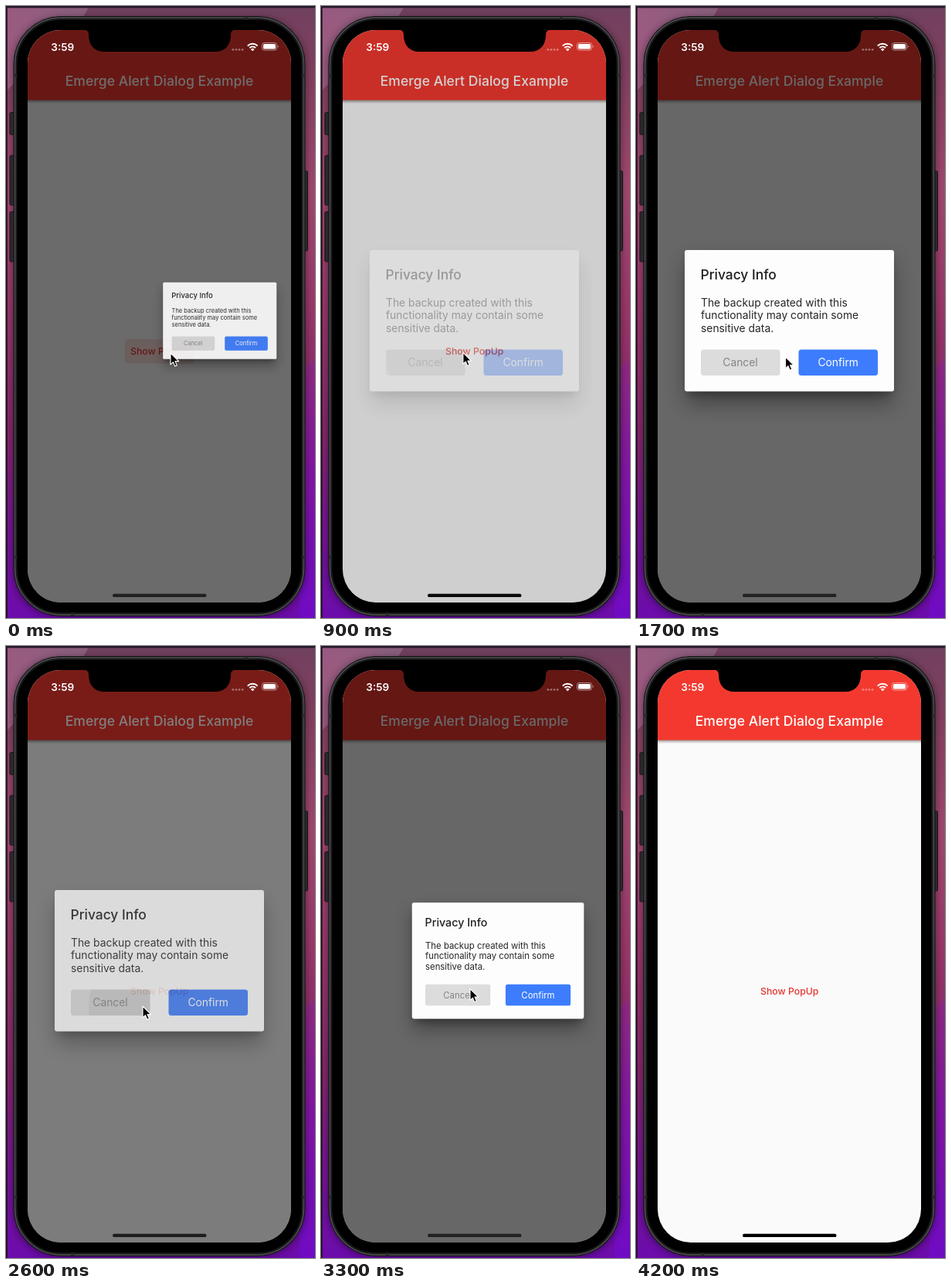
These frames come from a looping animation (400 by 790 pixels, 4900 ms). An HTML page:

```html
<!DOCTYPE html>
<html lang="en">
<head>
<meta charset="utf-8">
<title>Alert dialog</title>
<style>
  html, body { margin: 0; width: 100%; height: 100%; overflow: hidden; background: #000; }
  svg { display: block; }
  text { font-family: Inter, Roboto, sans-serif; }
  .mid { text-anchor: middle; }
  .medium { font-weight: 500; }
</style>
</head>
<body>
<svg width="400" height="790" viewBox="0 0 400 790">
  <defs>
    <linearGradient id="wall" x2="0" y2="1">
      <stop offset="0" stop-color="#70405f"/>
      <stop offset=".1" stop-color="#81405f"/>
      <stop offset=".3" stop-color="#a0486f"/>
      <stop offset=".5" stop-color="#98386a"/>
      <stop offset=".7" stop-color="#86266d"/>
      <stop offset=".84" stop-color="#761792"/>
      <stop offset="1" stop-color="#6c0cac"/>
    </linearGradient>
    <linearGradient id="violet" x2="0" y2="1">
      <stop offset="0" stop-color="#8f2b80"/>
      <stop offset=".4" stop-color="#8417a2"/>
      <stop offset="1" stop-color="#6f0bc4"/>
    </linearGradient>
    <linearGradient id="glow">
      <stop offset="0" stop-color="#a8638c"/>
      <stop offset="1" stop-color="#8f6a86"/>
    </linearGradient>
    <linearGradient id="fade" x2="0" y2="1">
      <stop offset="0" stop-color="#000" stop-opacity=".4"/>
      <stop offset="1" stop-color="#000" stop-opacity="0"/>
    </linearGradient>
    <filter id="soft" x="-30%" y="-40%" width="160%" height="190%"><feGaussianBlur stdDeviation="14"/></filter>
    <filter id="tight" x="-20%" y="-20%" width="140%" height="150%"><feGaussianBlur stdDeviation="5"/></filter>
    <filter id="halo" x="-10%" y="-10%" width="120%" height="120%"><feGaussianBlur stdDeviation="5"/></filter>
    <clipPath id="screen"><rect x="28" y="31" width="341" height="739" rx="43"/></clipPath>
    <clipPath id="showBox"><rect x="154" y="430" width="89" height="31.5" rx="3.5"/></clipPath>
    <clipPath id="cancelBox"><rect x="84" y="443.5" width="102.5" height="33.5" rx="3.5"/></clipPath>
  </defs>

  <!-- desktop -->
  <rect width="400" height="790" fill="url(#wall)"/>
  <path d="M0 0H108L100 14L0 110Z" fill="url(#glow)" opacity=".75"/>
  <path d="M400 455L380 474V790H400Z" fill="url(#violet)"/>
  <rect x="8" y="14" width="381" height="776" rx="62" fill="#000" opacity=".35" filter="url(#halo)"/>
  <path d="M0 0H400V2.5H0Z" fill="#24182a"/>
  <path d="M0 2H1.8V790H0Z" fill="#22101f"/>

  <!-- phone -->
  <g fill="#2c292d" stroke="#151316" stroke-width="1">
    <rect x="5" y="137.500" width="8" height="28.500" rx="1.500"/>
    <rect x="5" y="193" width="8" height="64" rx="1.500"/>
    <rect x="5" y="265.500" width="8" height="64.500" rx="1.500"/>
    <rect x="384" y="213" width="6.500" height="103" rx="1.500"/>
  </g>
  <rect x="10" y="13.500" width="377" height="774" rx="61" fill="#1d1d1f" stroke="#141315"/>
  <rect x="11.700" y="15.200" width="373.600" height="770.600" rx="59.500" fill="#000" stroke="#48474a" stroke-width="2"/>
  <rect x="13.700" y="17.200" width="369.600" height="766.600" rx="57.500" fill="#000" stroke="#1c1c1e" stroke-width="1.500"/>
  <path d="M10 89.500h4M10 711.500h4M383 89.500h4M383 711.500h4M311 13.500v4M86 783.500v4" stroke="#29282b" stroke-width="4"/>

  <!-- app -->
  <g clip-path="url(#screen)">
    <rect x="28" y="31" width="341" height="739" fill="#fafafa"/>
    <rect x="28" y="121" width="341" height="5" fill="url(#fade)"/>
    <rect x="28" y="31" width="341" height="90.500" fill="#f3392f"/>
    <text class="mid medium" x="198.500" y="103" font-size="17.500" letter-spacing=".05" fill="#fff">Emerge Alert Dialog Example</text>
    <g clip-path="url(#showBox)"><circle id="showInk" fill="#f3392f" fill-opacity=".16"/></g>
    <text class="mid medium" x="198.700" y="449.800" font-size="12.250" fill="#e5352c">Show PopUp</text>
    <rect id="barrier" x="28" y="31" width="341" height="739" fill="#000"/>

    <g id="dialog">
      <rect x="65" y="330" width="267" height="183" fill="#000" opacity=".36" filter="url(#soft)"/>
      <rect x="67" y="324" width="263" height="178" fill="#000" opacity=".24" filter="url(#tight)"/>
      <rect x="63" y="315" width="271" height="182.500" rx="3" fill="#fdfdfd"/>
      <text class="medium" x="83.500" y="352.500" font-size="17.400" fill="#1f1f1f">Privacy Info</text>
      <g font-size="13.850" fill="#262626">
        <text x="84" y="387.500">The backup created with this</text>
        <text x="84" y="404">functionality may contain some</text>
        <text x="84" y="420.500">sensitive data.</text>
      </g>
      <rect x="84" y="443.500" width="102.500" height="33.500" rx="3.500" fill="#dcdcdc"/>
      <g clip-path="url(#cancelBox)"><circle id="cancelInk" fill="#000" fill-opacity=".06"/></g>
      <rect x="210.500" y="443.500" width="102.500" height="33.500" rx="3.500" fill="#3d7dfd"/>
      <g class="mid" font-size="13.850">
        <text x="135" y="465" fill="#858585">Cancel</text>
        <text x="261.700" y="465" fill="#fff">Confirm</text>
      </g>
    </g>
  </g>

  <!-- notch, status bar, home bar -->
  <path d="M101 30.500C105 31 107 33 107 37.500C107 51 115 59 127 59H271C283 59 291 51 291 37.500C291 33 293 31 297 30.500Z" fill="#000"/>
  <text x="58.300" y="57.500" font-size="13.600" font-weight="600" fill="#fff">3:59</text>
  <g fill="#fff" fill-opacity=".38">
    <circle cx="293.800" cy="56.300" r="1.400"/><circle cx="297.900" cy="56.300" r="1.400"/>
    <circle cx="302" cy="56.300" r="1.400"/><circle cx="306.100" cy="56.300" r="1.400"/>
  </g>
  <g fill="none" stroke="#fff" stroke-width="2">
    <path d="M312.800 51.400A9.300 9.300 0 0 1 325.600 51.400"/>
    <path d="M315.300 54A5.700 5.700 0 0 1 323.100 54"/>
  </g>
  <path d="M319.200 58.200L316.900 55.900A3.300 3.300 0 0 1 321.500 55.900Z" fill="#fff"/>
  <rect x="331.500" y="47.500" width="19" height="9.500" rx="2.800" fill="none" stroke="#fff" stroke-opacity=".5"/>
  <rect x="333" y="49" width="16" height="6.500" rx="1.500" fill="#fff"/>
  <path d="M351.800 50.500a2 2 0 0 1 0 3.500Z" fill="#fff" fill-opacity=".5"/>
  <rect id="home" x="138" y="758.700" width="121.500" height="4.400" rx="2.200"/>

  <path id="cursor" d="M0 0V14.800L3.400 11.600L5.700 17L8.300 15.900L6 10.600H10.700Z" fill="#000" stroke="#fff" stroke-width="1.100" stroke-linejoin="round"/>
</svg>
<script>
const LOOP = 4900, STEP = 100, FADE = 150, GROW = 300;
const PIVOT = [369.5, 406.3];

// one row per popup: open, close, press on the button, press on Cancel
const popups = [
  [-113, 780, -175, 640],
  [1122, 2533, 1080, 2400],
  [3108, 3890, 3050, 3780],
];

// time, x, y of the pointer tip
const path = [
  [0, 213, 448], [500, 176, 449], [800, 176, 449], [1080, 203, 443.5], [1250, 203, 443.5],
  [1700, 193.5, 453], [2350, 177, 465], [2650, 177, 465], [3000, 193, 442.5],
  [3300, 193, 442.5], [3600, 177, 459], [4200, 177, 459],
];

const $ = id => document.getElementById(id);
const set = (id, attrs) => {
  for (const k in attrs) $(id).setAttribute(k, attrs[k]);
};
const clamp = v => Math.min(1, Math.max(0, v));

function bezier(x1, y1, x2, y2) {
  const at = (a, b, u) => 3 * a * u * (1 - u) ** 2 + 3 * b * u * u * (1 - u) + u ** 3;
  return x => {
    if (x <= 0 || x >= 1) return clamp(x);
    let lo = 0, hi = 1;
    for (let i = 0; i < 24; i++) {
      const u = (lo + hi) / 2;
      if (at(x1, x2, u) < x) lo = u; else hi = u;
    }
    return at(y1, y2, lo);
  };
}
const ease = bezier(.25, .1, .25, 1);
const easeOut = bezier(0, 0, .58, 1);

function pointer(t) {
  const i = Math.max(1, path.findIndex(p => p[0] >= t));
  const [t0, x0, y0] = path[i - 1], [t1, x1, y1] = path[i];
  const k = clamp((t - t0) / (t1 - t0)), s = k * k * (3 - 2 * k);
  return [x0 + (x1 - x0) * s, y0 + (y1 - y0) * s];
}

function ink(id, t, press, origin, opacity) {
  const [x, y] = pointer(Math.max(0, origin));
  set(id, { cx: x, cy: y, r: Math.max(0, (t - press) * .35), opacity });
}

function draw(t) {
  const [open, close, press, cancel] = popups.filter(p => p[2] <= t).pop();
  const p = t < close ? clamp((t - open) / FADE) : clamp(1 - (t - close) / FADE);
  const scale = easeOut(clamp((t - open) / GROW));
  const shade = ease(p);
  const [px, py] = PIVOT;

  set('barrier', { opacity: shade * .59 });
  set('dialog', {
    opacity: easeOut(p),
    transform: `translate(${px} ${py}) scale(${scale}) translate(${-px} ${-py})`,
  });
  const grey = Math.round(34 * shade);
  set('home', { fill: `rgb(${grey},${grey},${grey})` });
  ink('showInk', t, press, press, clamp((open + 190 - t) / 80));
  ink('cancelInk', t, cancel, cancel, t >= cancel ? 1 : 0);

  const shown = t < 4200;
  set('cursor', { visibility: shown ? 'visible' : 'hidden' });
  if (shown) set('cursor', { transform: `translate(${pointer(t)})` });
}

const start = performance.now();
function tick() {
  const t = (performance.now() - start) % LOOP;
  draw(Math.floor(t / STEP) * STEP);
  requestAnimationFrame(tick);
}
tick();
</script>
</body>
</html>
```
